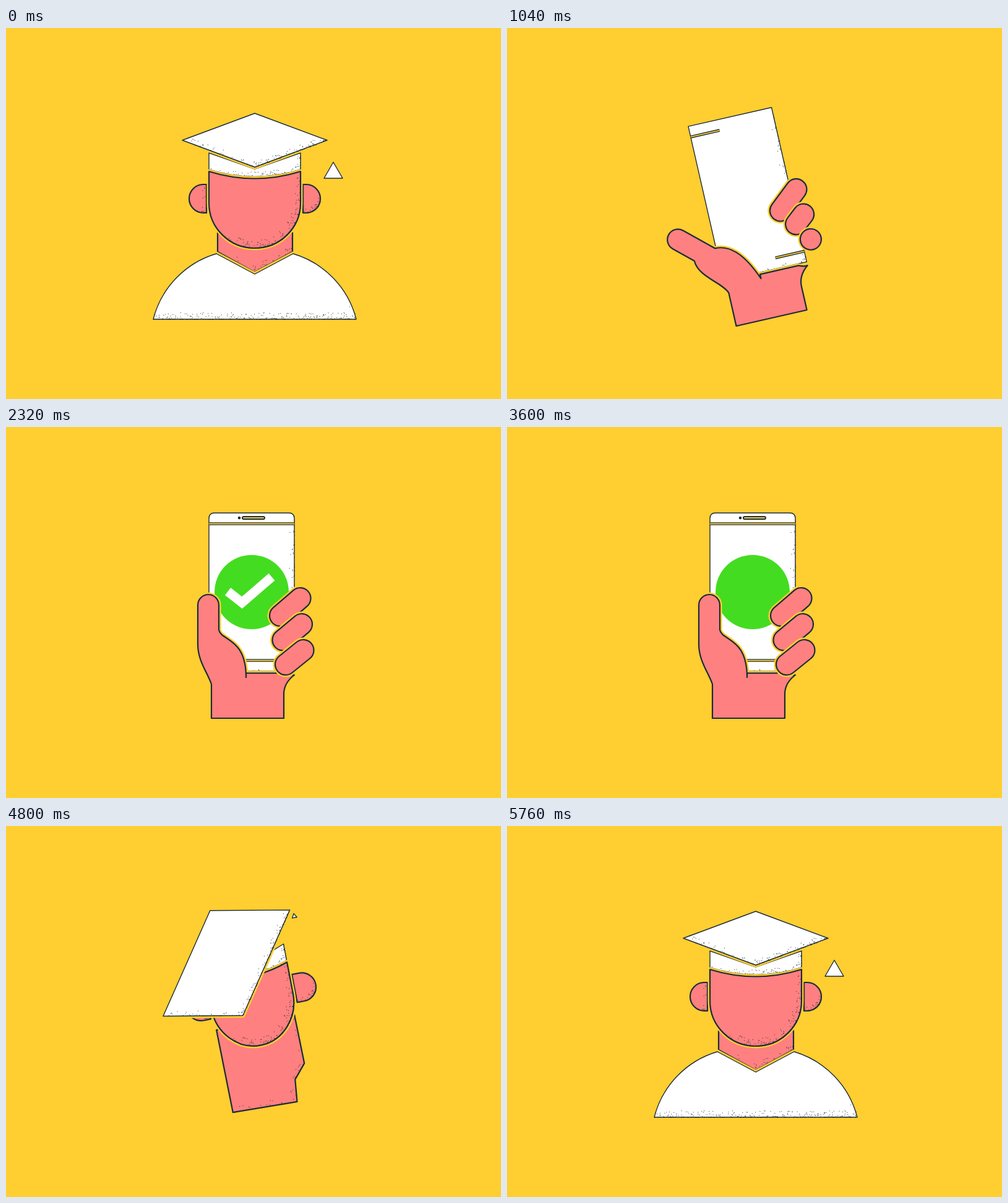
Animation, 800 px wide and 600 px high, one loop 5840 ms. Source, as an HTML page:

```html
<!DOCTYPE html>
<html lang="en">
<head>
<meta charset="utf-8">
<title>Graduate and phone</title>
<style>
  html, body { margin: 0; width: 100%; height: 100%; overflow: hidden; background: #ffce30; }
  svg { display: block; width: 100vw; height: 100vh; }
</style>
</head>
<body>
<svg viewBox="0 0 800 600"><g id="scene"></g></svg>
<script>
const LOOP = 5840, STEP = 80, MID = 402;
const YELLOW = '#ffce30', NAVY = '#1b2b38', SKIN = '#ff8080', GREEN = '#44dc20';
const scene = document.getElementById('scene');

// ---------- helpers ----------
const clamp = v => Math.max(0, Math.min(1, v));
const lerp = (a, b, u) => a + (b - a) * u;
const ramp = (v, a, b) => clamp((v - a) / (b - a));
const ease = (v, a, b) => (1 - Math.cos(Math.PI * ramp(v, a, b))) / 2;
const show = (el, on) => { el.style.display = on ? '' : 'none'; };

function make(tag, attrs, parent = scene) {
  const el = document.createElementNS('http://www.w3.org/2000/svg', tag);
  for (const k in attrs) el.setAttribute(k, attrs[k]);
  return parent.appendChild(el);
}

function keyed(keys, t) {
  for (let i = 1; i < keys.length; i++) {
    const [a, va] = keys[i - 1], [b, vb] = keys[i];
    if (t < b) return lerp(va, vb, ease(t, a, b));
  }
  return keys[keys.length - 1][1];
}

function seeded(seed) {
  return () => (seed = (seed * 16807) % 2147483647) / 2147483647;
}

// Filled outline with a background-coloured gap around it and grain on its shaded side
class Shape {
  constructor(fill, dots = 0, depth = 9) {
    const round = { 'stroke-linejoin': 'round' };
    this.g = make('g', {});
    this.gap = make('path', { fill: 'none', stroke: YELLOW, 'stroke-width': 7, ...round }, this.g);
    this.body = make('path', { fill, stroke: NAVY, 'stroke-width': fill === SKIN ? 2.2 : 1.4, ...round }, this.g);
    this.grain = make('path', { fill: NAVY }, this.g);
    Object.assign(this, { dots, depth });
  }
  draw(d, shown = true) {
    show(this.g, shown);
    if (!shown) return;
    this.gap.setAttribute('d', d);
    this.body.setAttribute('d', d);
    if (this.dots) this.grain.setAttribute('d', this.speckle());
  }
  speckle() {
    const N = 90, len = this.body.getTotalLength(), rnd = seeded(4711);
    const pts = Array.from({ length: N }, (_, i) => this.body.getPointAtLength(len * i / N));
    let d = '';
    for (let i = 0; i < this.dots; i++) {
      const pos = rnd() * N, keep = rnd(), r = this.depth * rnd() ** 3;
      const k = Math.floor(pos), p = pts[k], q = pts[(k + 1) % N];
      const dx = q.x - p.x, dy = q.y - p.y, l = Math.hypot(dx, dy) || 1;
      const nx = dy / l, ny = -dx / l;
      if (keep > nx * 0.5 + ny * 0.85) continue;
      const x = lerp(p.x, q.x, pos - k) - nx * r, y = lerp(p.y, q.y, pos - k) - ny * r;
      d += `M${x.toFixed(1)} ${y.toFixed(1)}h1v1h-1z`;
    }
    return d;
  }
}

// ---------- layers, back to front ----------
const neck = new Shape(SKIN, 200, 10);
const shirt = new Shape('#fff', 900, 11);
const ears = [-1, 1].map(side => ({ side, shape: new Shape(SKIN, 130, 8) }));
const band = new Shape('#fff', 360, 9);
const face = new Shape(SKIN, 550, 13);
const board = new Shape('#fff', 400, 9);

const slot = () => [[NAVY, 4.6], [YELLOW, 1.8]].map(([stroke, w]) =>
  make('path', { stroke, 'stroke-width': w }));
const topLine = slot(), lowLine = slot();
const speaker = make('rect', { y: 145, height: 4, rx: 2, fill: YELLOW, stroke: NAVY, 'stroke-width': 1.9 });
const camera = make('circle', { cx: 377, cy: 147, fill: NAVY });

const badge = make('circle', { cx: 397, cy: 267, fill: GREEN });
const tick = make('path', {
  d: 'M358.5 266L381.5 284L429.5 242.5', fill: 'none', stroke: '#fff', 'stroke-width': 15, pathLength: 100
});

const hand = new Shape(SKIN);
const fingers = [0, 1, 2].map(() => [[YELLOW, 7], [NAVY, 2.2], [SKIN, -2.2]].map(([stroke, grow]) => ({
  grow, el: make('path', { stroke, 'stroke-linecap': 'round' })
})));
const tassel = new Shape('#fff');

// ---------- motion ----------
const TILT = [[0, 0], [330, 5.5], [650, -13.2], [860, -13.2], [1300, 5.4], [1600, -1], [1840, 0]];

// m: 0 phone in hand, 1 graduate; open: how far the hand is spread
function pose(t) {
  if (t >= 140 && t < 3840) {
    const s = t - 140;
    return { tilt: keyed(TILT, s), m: 1 - ease(s, 340, 880), open: 1 - ease(s, 900, 1260) };
  }
  const s = (t - 3840 + LOOP) % LOOP;
  return { tilt: keyed(TILT, s), m: ease(s, 650, 1240), open: ease(s, 340, 640) };
}

// Phone and cap are one quadrilateral: a rectangle turning into a diamond
function drawBoard(m, open) {
  const bulge = Math.sin(Math.PI * m);
  const [a, b, c, d] = [0, 1, 2, 3].map(i => {
    const turn = i * Math.PI / 2, corner = turn - Math.PI / 4;
    const x = lerp(397 + 69 * Math.SQRT2 * Math.sin(corner), MID + 117 * Math.sin(turn), m);
    const y = lerp(267 - 128 * Math.SQRT2 * Math.cos(corner), 181.5 - 43.5 * Math.cos(turn), m);
    return i < 2 ? [x - 5 * bulge, y - 12 * bulge] : [x - 49 * bulge, y];
  });
  const closed = m > 0 ? 0 : clamp(1 - open * 2), r = 9 * closed;
  board.draw(`M${a[0]} ${a[1] + r}Q${a} ${a[0] + r} ${a[1]}L${b[0] - r} ${b[1]}Q${b} ${b[0]} ${b[1] + r}L${c}L${d}Z`);

  const line = lerp(138, 48, open) * (1 - ramp(m, 0, 0.3));
  topLine.forEach(el => el.setAttribute('d', line > 1 ? `M328 156.5h${line}` : ''));
  lowLine.forEach(el => el.setAttribute('d', line > 1 ? `M466 377.5h${-line}` : ''));
  speaker.setAttribute('x', 400 - 18 * closed);
  speaker.setAttribute('width', 36 * closed);
  show(speaker, closed > 0.05);
  camera.setAttribute('r', 2.3 * closed);
}

function drawHead(m) {
  const late = ramp(m, 0.5, 1), seen = m > 0.05;
  const w = 74 * lerp(0.9, 1, late), l = MID - w, r = MID + w;
  const at = (x0, y0, x1, y1) => `${lerp(x0, x1, late)} ${lerp(y0, y1, late)}`;

  // wrist turning into a pointed neck
  neck.draw(`M${at(336, 317, 342, 331)}L${at(465, 317, 463, 331)}L${at(466, 401, 463, 362)}
    L${at(450, 423, MID, 395)}L${at(446, 462, MID, 395)}L${at(337, 462, 342, 362)}Z`, seen);

  const g = ramp(m, 0.55, 1), arc = `A${149 * g} ${149 * g} 0 0 1`;
  const sx = v => MID + v * g, sy = v => 471 - v * g;
  shirt.draw(`M${sx(-164)} 471${arc} ${sx(-62)} ${sy(106)}L${MID} ${sy(73)}
    L${sx(62)} ${sy(106)}${arc} ${sx(164)} 471Z`, g > 0.02);

  const e = ramp(m, 0.15, 0.45), R = 23 * e;
  ears.forEach(({ side, shape }) => {
    const flat = MID + side * (w + 4), mid = MID + side * lerp(62, 83, e);
    const ends = [276 - side * R, 276 + side * R];
    shape.draw(`M${flat} ${ends[0]}L${mid} ${ends[0]}A${R} ${R} 0 0 1 ${mid} ${ends[1]}L${flat} ${ends[1]}Z`, e > 0.5);
  });

  band.draw(`M${l} 202L${MID} 228L${r} 202V229Q${MID} 252 ${l} 229Z`, seen);
  face.draw(`M${l} 232Q${MID} 255 ${r} 232V283A${w} 73 0 0 1 ${l} 283Z`, seen);

  const q = ramp(m, 0.38, 1), tx = lerp(483, 529, q), ty = lerp(136, 232, q);
  tassel.draw(`M${tx} ${ty - 15 * q}L${tx + 15 * q} ${ty + 11 * q}H${tx - 15 * q}Z`, q > 0.02);
}

// Thumb: a capsule that swings outwards, then tucks into the palm
function drawThumb(m, open) {
  const tuck = ease(m, 0, 0.3), reach = 1 - tuck, r = 17;
  const a = lerp(90, 42, open) * Math.PI / 180, dx = Math.cos(a), dy = Math.sin(a);
  const x = lerp(lerp(327, 271, open), 353, tuck), y = lerp(lerp(288, 314, open), 400, tuck);
  const edge = (side, len) => [x + side * r * dy + len * dx * reach, y - side * r * dx + len * dy * reach];
  const outer = edge(-1, lerp(64, 40, open)), inner = edge(1, lerp(40, 59, open));
  const bend = `${inner[0] + lerp(3, 22, open) * reach} ${inner[1] + lerp(18, 0, open) * reach}`;
  const web = `${lerp(388, 369, open)} ${lerp(340, 356, open)}`;
  hand.draw(`M332 471V416C326 398 ${outer[0]} ${outer[1] + 26 * reach} ${outer}
    L${edge(-1, 0)}A${r} ${r} 0 0 1 ${edge(1, 0)}L${inner}C${bend} ${web} 388 405
    V398H452Q460 402 466 401Q449 414 449 432V471Z`, m < 0.3);
}

function drawFingers(m, open) {
  const gone = ramp(m, 0, 0.3);
  fingers.forEach((layers, i) => {
    const tip = [475.5 + 2.5 * i, 277 + 42 * i], base = [443 + 4.5 * i, 305 + 39.5 * i];
    const curl = Math.max(gone, open * i / 2), r = 17 * (1 - gone);
    const from = base.map((v, k) => lerp(v, tip[k], curl));
    layers.forEach(({ el, grow }) => {
      show(el, r > 1);
      el.setAttribute('d', `M${from}L${tip[0] + 0.01} ${tip[1]}`);
      el.setAttribute('stroke-width', Math.max(0, 2 * r + grow));
    });
  });
}

function drawBadge(t) {
  const size = t < 3000
    ? keyed([[1960, 0], [2120, 1.12], [2220, 1]], t)
    : keyed([[3600, 1], [3690, 1.15], [3840, 0]], t);
  badge.setAttribute('r', 60 * size);
  const drawn = ease(t, 2100, 2300) * (1 - ease(t, 3340, 3560));
  show(tick, drawn > 0.01);
  tick.setAttribute('stroke-dasharray', `${100 * drawn} 200`);
}

function render(t) {
  const { tilt, m, open } = pose(t);
  scene.setAttribute('transform', `rotate(${tilt.toFixed(3)} 400 305)`);
  drawHead(m);
  drawBoard(m, open);
  drawBadge(t);
  drawThumb(m, open);
  drawFingers(m, open);
}

const start = performance.now();
let last = -1;
function loop() {
  const t = Math.floor(((performance.now() - start) % LOOP) / STEP) * STEP;
  if (t !== last) render(last = t);
  requestAnimationFrame(loop);
}
loop();
</script>
</body>
</html>
```
